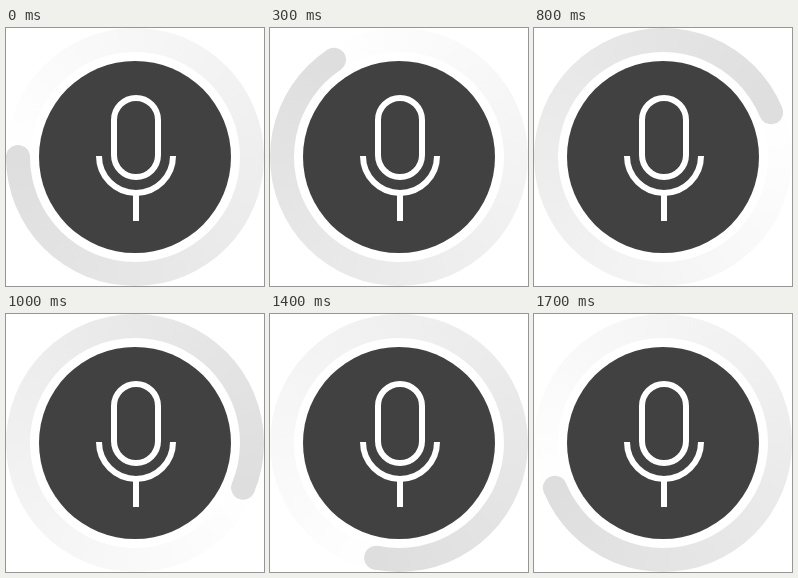
Recreate the animation shown at these times as an HTML page. Size 258x258 px, loop 1800 ms.

```html
<!DOCTYPE html>
<html lang="en">
<head>
<meta charset="utf-8">
<title>Voice recording</title>
<style>
  html, body { margin: 0; width: 100%; height: 100%; overflow: hidden; background: #fff; }
  #stage { position: relative; width: 258px; height: 258px; }
  #ring {
    position: absolute; inset: 0; border-radius: 50%;
    background: conic-gradient(#fff, #dedede);
  }
  svg { position: absolute; left: 0; top: 0; display: block; }
</style>
</head>
<body>
<div id="stage">
  <div id="ring"></div>
  <svg width="258" height="258" viewBox="0 0 258 258">
    <circle cx="129" cy="129" r="105" fill="#fff"/>
    <circle id="cap" cx="129" cy="12" r="12" fill="#dedede"/>
    <circle cx="129" cy="129" r="96" fill="#414141"/>
    <g fill="none" stroke="#fff" stroke-width="6">
      <rect x="108" y="70" width="44" height="79" rx="22"/>
      <path d="M93 128a37 37 0 0 0 74 0M130 165V193"/>
    </g>
  </svg>
</div>
<script>
  const LOOP = 1800, TICK = 100, STOPS = 32, START = -90;
  const ring = document.getElementById('ring');
  const cap = document.getElementById('cap');

  // The head snaps to the nearest of 32 evenly spaced stops on each tick.
  function draw(time) {
    const tick = Math.floor((time % LOOP) / TICK);
    const stop = Math.round(tick * TICK / LOOP * STOPS);
    const angle = START + stop * 360 / STOPS;
    ring.style.transform = `rotate(${angle}deg)`;
    cap.setAttribute('transform', `rotate(${angle} 129 129)`);
  }

  const begin = performance.now();
  function loop() {
    draw(performance.now() - begin);
    requestAnimationFrame(loop);
  }
  draw(0);
  requestAnimationFrame(loop);
</script>
</body>
</html>
```
